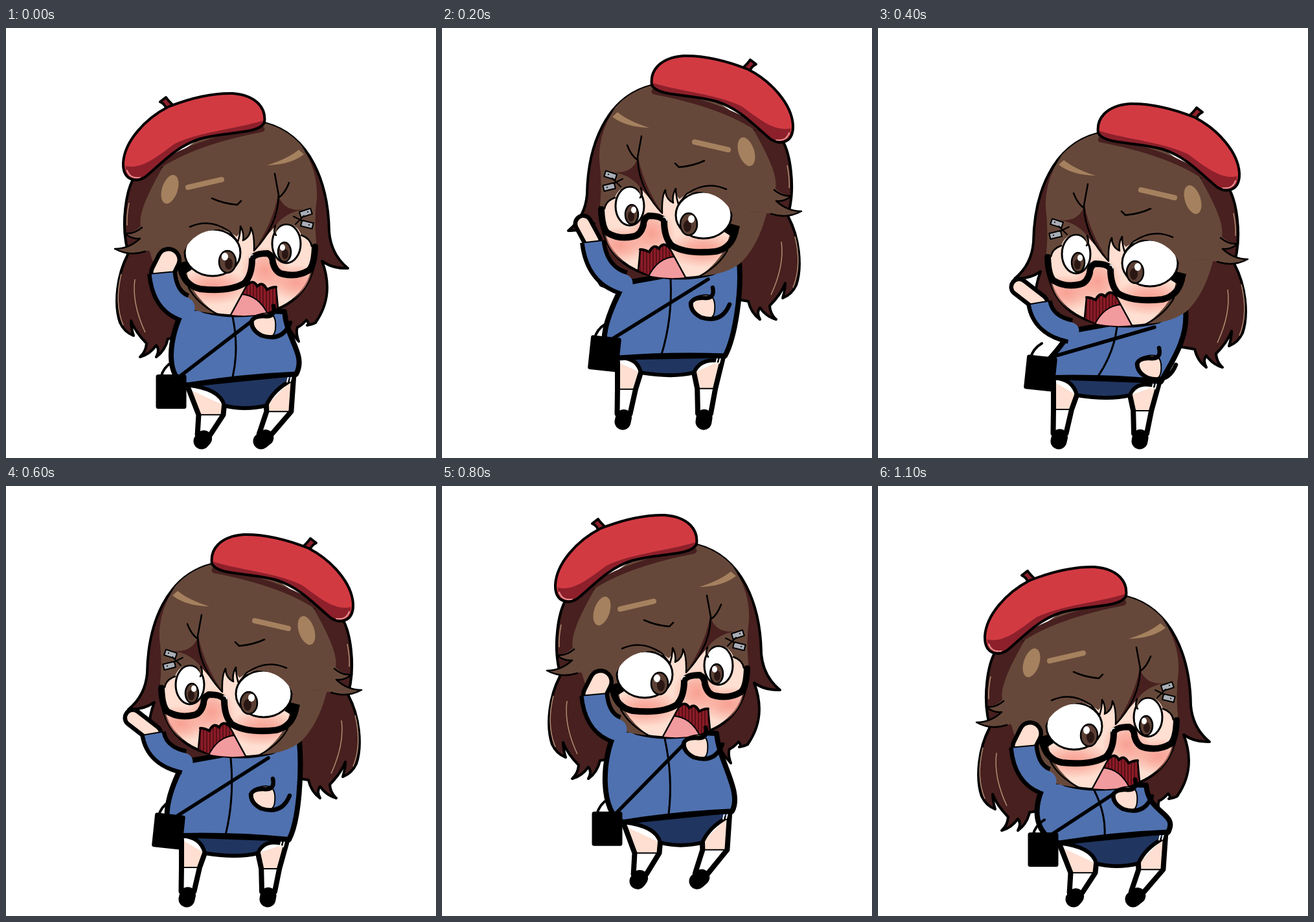
An HTML page for the animation above (1.2 s loop, 664 by 664 pixels).

```html
<!DOCTYPE html>
<html lang="en">
<head>
<meta charset="utf-8">
<title>Panicking chibi</title>
<style>
html, body { margin: 0; width: 100%; height: 100%; overflow: hidden; background: #fff; }
svg { display: block; width: 100vw; height: 100vh; }
.ink { fill: none; stroke: #000; stroke-width: 2.5; }
.bold { stroke-width: 4; }
.frame { stroke-width: 10; }
.hair { fill: #66483a; }
.dark { fill: #47201f; }
.glow { fill: #a5815f; }
.skin { fill: #fedfd1; }
</style>
</head>
<body>
<svg viewBox="0 0 664 664" stroke-linejoin="round">
  <defs>
    <radialGradient id="blush">
      <stop offset="0" stop-color="#f79a8c" stop-opacity=".9"/>
      <stop offset=".4" stop-color="#f79a8c" stop-opacity=".65"/>
      <stop offset="1" stop-color="#f79a8c" stop-opacity="0"/>
    </radialGradient>
    <clipPath id="mouth"><path d="M347 443L372 397Q382 387 388 399Q396 390 403 404Q410 400 417 400L420 432L400 441Q375 446 347 443Z"/></clipPath>
    <clipPath id="cheeks"><path d="M270 330L262 385Q285 430 305 438Q350 450 400 440C450 428 478 395 479 335L440 280L330 290Z"/></clipPath>
  </defs>

  <g class="head">
    <path class="dark ink bold" style="fill:#47201f" d="M197 232C184 255 180 300 185 330Q188 345 188 350C172 380 166 425 176 455Q183 470 197 475Q193 462 193 452Q200 470 217 487Q216 500 207 508Q222 504 232 490Q238 497 232 508Q246 498 250 480L430 450Q436 466 452 484Q447 470 450 462Q455 461 464 451Q469 457 465 459Q475 457 478 455C492 435 505 405 488 360Q505 372 528 371Q502 350 499 315C498 240 470 165 400 147Z"/>
    <path fill="none" stroke="#b28c72" stroke-width="1.5" d="M178 380Q167 425 181 459M199 388Q194 425 215 470M190 270Q186 290 187 305"/>
  </g>

  <g id="body" stroke-linecap="round"></g>

  <g class="head" stroke-linecap="round">
    <path class="skin" stroke="#000" stroke-width="4" d="M270 330L262 385Q285 430 305 438Q350 450 400 440C450 428 478 395 479 335L440 280L330 290Z"/>
    <g fill="url(#blush)" clip-path="url(#cheeks)">
      <ellipse cx="320" cy="400" rx="60" ry="28"/>
      <ellipse cx="400" cy="375" rx="38" ry="38"/>
      <ellipse cx="448" cy="393" rx="46" ry="28"/>
    </g>

    <g clip-path="url(#mouth)">
      <path fill="#8c1c26" d="M340 385H425V450H340Z"/>
      <path id="teeth" stroke="#4a0d14" stroke-width="1.5"/>
      <path fill="#f29b9f" stroke="#000" stroke-width="2" d="M340 450L362 411Q393 412 408 450Z"/>
    </g>
    <path class="ink" d="M347 443L372 397M417 400L420 432"/>
    <path class="ink bold" d="M372 397Q382 387 388 399Q396 390 403 404Q410 400 417 400"/>

    <path class="hair" d="M215 340L280 345Q268 400 325 441Q285 439 262 421Q235 395 222 345Z"/>
    <path class="ink" d="M282 401Q295 425 325 441"/>
    <g fill="#fff" stroke="#000" stroke-width="3">
      <ellipse cx="319" cy="347" rx="43" ry="36"/>
      <ellipse cx="433" cy="333" rx="22" ry="30"/>
    </g>
    <g fill="#5c4035" stroke="#000" stroke-width="2.5">
      <ellipse cx="342" cy="361" rx="13" ry="17"/>
      <ellipse cx="430" cy="346" rx="10" ry="15"/>
    </g>
    <g fill="#2a1714"><ellipse cx="344" cy="364" rx="6" ry="9"/><ellipse cx="431" cy="349" rx="5" ry="8"/></g>
    <g fill="#fff"><ellipse cx="338" cy="353" rx="5" ry="6"/><ellipse cx="427" cy="339" rx="4" ry="5"/></g>

    <path class="hair" d="M246 208C222 250 204 285 208 306Q197 317 183 317Q195 326 205 325Q190 341 168 341Q190 353 215 345Q240 336 272 350L280 335Q298 311 330 311Q345 313 356 322Q362 318 362 306Q367 318 366 328Q378 322 378 308Q384 318 383 344Q405 315 416 305Q412 315 417 320Q417 302 433 302Q450 303 456 320Q468 325 472 338L480 340Q475 300 480 262Q482 220 455 180Q432 155 400 147L300 170Z"/>
    <path class="dark" d="M420 258Q412 300 384 342Q402 322 418 303Q432 285 460 280Q430 285 420 258Z"/>
    <path class="ink" d="M210 308Q197 319 183 317Q195 327 207 325Q190 341 168 341Q190 353 215 345M284 307Q315 293 345 314Q352 322 358 330Q362 318 362 306Q368 316 366 328Q378 322 378 308Q384 318 383 344Q420 305 421 258L415 225M416 305Q412 315 417 320M318 263Q335 271 357 273L363 267M421 262Q431 255 437 239M456 320Q470 325 472 337"/>
    <path fill="none" stroke="#47201f" stroke-width="9" d="M216 228Q270 180 395 156"/>
    <ellipse class="glow" cx="253" cy="249" rx="12" ry="23" transform="rotate(18 253 249)"/>
    <path fill="none" stroke="#a5815f" stroke-width="8" d="M281 246L333 234"/>
    <path class="glow" d="M403 212Q435 202 452 188L460 195Q440 211 403 212Z"/>
    <g fill="#a9adb5" stroke="#000" stroke-width="2">
      <rect x="454" y="281" width="18" height="9" transform="rotate(-18 463 286)"/>
      <rect x="456" y="299" width="18" height="9" transform="rotate(14 465 303)"/>
      <path d="M444 291L458 298M447 303L460 290M466 284h.1M468 304h.1"/>
    </g>

    <path class="ink frame" d="M270 372Q276 398 300 403Q345 408 368 394Q380 382 380 356Q384 348 404 348Q412 352 412 362Q416 378 428 380Q450 385 468 374Q476 366 477 338"/>
    <path d="M263 364L278 360L287 373L276 380L266 376Z"/>
    <path fill="none" stroke="#fff" stroke-width="1.5" d="M376 355Q377 350 381 350"/>

    <path fill="#8d202b" stroke="#000" stroke-width="4" d="M247 124Q246 118 238 114L247 107Q251 113 261 122"/>
    <path fill="#d23a42" d="M181 208C183 175 215 140 250 122Q305 100 350 101C388 104 402 125 399 146C390 164 345 159 300 171C260 184 240 210 215 230C199 240 180 234 181 208Z"/>
    <path fill="#8d202b" d="M185 213C210 219 235 197 260 179C300 160 350 157 397 143L399 146C390 164 345 159 300 171C260 184 240 210 215 230C199 240 184 230 185 213Z"/>
    <path fill="none" stroke="#ed9294" stroke-width="2" d="M187 220Q191 233 207 231"/>
    <path class="ink bold" d="M181 208C183 175 215 140 250 122Q305 100 350 101C388 104 402 125 399 146C390 164 345 159 300 171C260 184 240 210 215 230C199 240 180 234 181 208Z"/>
  </g>

  <g id="arms"></g>
</svg>
<script>
const SKIN = '#fedfd1', BLUE = '#4f71af', NAVY = '#203560';
const stepTime = 100;

// Head offset at each step; it looks left while x is large
const moves = [
  [0, 0], [726, -79], [723, -58], [720, -30], [739, 16], [735, 5],
  [717, -26], [713, -85], [-6, -56], [-7, -14], [-20, 20], [-16, 24]
];

// Body proportions for each facing
const looks = {
  right: {
    hemX: 364, feet: [-62, 30], knee: 10, calf: 19, crotch: [-27, 38], drop: 44,
    shoulder: [-75, -14], neck: [80, -8], zip: 0, bag: [-25, 10], bagTurn: 0, sleeve: 33, palm: 27
  },
  left: {
    hemX: 353, feet: [-74, 51], knee: 0, calf: 14, crotch: [-46, 36], drop: 28,
    shoulder: [-92, 6], neck: [86, -26], zip: -20, bag: [-18, -7], bagTurn: 6, sleeve: 27, palm: 18
  }
};

const add = (p, x, y) => [p[0] + x, p[1] + y];
const mix = (p, q, t) => p.map((v, i) => v + (q[i] - v) * t);
const path = (d, fill, width = 0, color = '#000', cap = 'round') =>
  `<path d="${d}" fill="${fill}" stroke="${width ? color : 'none'}" stroke-width="${width}" stroke-linecap="${cap}"/>`;
const line = (...pts) => 'M' + pts.join('L');

function leg(outer, inner, foot, side, look) {
  const knee = add(mix(mix(outer, inner, .5), foot, .4), look.knee, 0);
  const ankle = mix(knee, foot, .75);
  const w = side * look.calf;
  const knees = [add(knee, -w, 0), add(knee, w, 0)];
  const ankles = [add(ankle, -side * 10, 0), add(ankle, side * 10, 0)];
  return path(line(outer, knees[0], knees[1], inner), SKIN) +
    path(line(knees[0], ankles[0], ankles[1], knees[1]), '#fff') +
    path(line(outer, knees[0], ankles[0]) + line(inner, knees[1], ankles[1]), 'none', 8) +
    path(line(...knees), 'none', 2) +
    path(line(add(ankle, 0, 6), foot), 'none', 25);
}

function torso(chin, hem, tilt, footY, look) {
  const hemL = add(hem, -84, -tilt / 2), hemR = add(hem, 84, tilt / 2);
  const shoulder = add(chin, ...look.shoulder), neck = add(chin, ...look.neck);
  const [crotchL, crotchR] = look.crotch.map(x => add(hem, x, look.drop - 4));
  const [footL, footR] = look.feet.map(x => [hem[0] + x, footY]);
  const bag = add(hemL, ...look.bag);
  const zip = add(chin, look.zip, 0);
  const [x, y] = hemR;
  return leg(add(hemL, 2, 6), crotchL, footL, 1, look) +
    leg(add(hemR, -4, 6), crotchR, footR, -1, look) +
    path(`M${hemL}Q${add(crotchL, -6, -26)} ${crotchL}Q${add(hem, 4, look.drop + 4)} ${crotchR}Q${add(crotchR, 10, -24)} ${add(hemR, -5, 8)}L${hemR}Z`, NAVY, 6) +
    path(`M${x - 12} ${y + 4}l-2 8m7 -9l-2 8`, 'none', 2, '#fff') +
    path(`M${shoulder}C${add(shoulder, -24, 45)} ${add(hemL, -36, -12)} ${hemL}Q${add(hem, 0, -5)} ${hemR}C${add(hemR, 16, -30)} ${add(neck, 4, 45)} ${neck}Z`, BLUE, 8) +
    path(`M${zip}Q${add(mix(zip, hem, .5), 3, 0)} ${add(hem, -14, -4)}`, 'none', 3) +
    path(line(add(chin, 38, 0), add(bag, 14, -24)), 'none', 5.5) +
    path(`M${add(bag, -16, -22)}q4 -16 18 -24`, 'none', 4) +
    `<rect x="${bag[0] - 22}" y="${bag[1] - 25}" width="44" height="50" rx="2" transform="rotate(${look.bagTurn} ${bag})" stroke="#000" stroke-width="3"/>`;
}

function raisedArm(wrist, tip, shoulder, look) {
  const bend = [mix(wrist, shoulder, .12)[0], mix(shoulder, wrist, .2)[1]];
  const sleeve = `M${wrist}Q${bend} ${shoulder}`;
  const palm = line(wrist, tip);
  const [dx, dy] = add(bend, -wrist[0], -wrist[1]);
  const k = look.sleeve / 2 / Math.hypot(dx, dy);
  return path(palm, 'none', look.palm + 13) + path(palm, 'none', look.palm, SKIN) +
    path(sleeve, 'none', look.sleeve + 13, '#000', 'butt') +
    path(sleeve, 'none', look.sleeve, BLUE, 'butt') +
    `<circle cx="${shoulder[0]}" cy="${shoulder[1]}" r="${look.sleeve / 2}" fill="${BLUE}"/>` +
    path(line(add(wrist, -dy * k, dx * k), add(wrist, dy * k, -dx * k)), 'none', 2);
}

function loweredArm(fist) {
  return path(`M${add(fist, -15, -14)}q-8 16 10 28q20 10 22 -8q2 -20 -8 -24q-12 -2 -24 4Z`, SKIN, 2) +
    path(`M${add(fist, 14, -30)}q4 18 -14 16q-16 -1 -20 8q0 14 16 22q32 10 44 -20`, 'none', 6.5);
}

function draw(step) {
  const [x, y] = moves[step];
  const left = x > 332;
  const look = left ? looks.left : looks.right;
  const chin = [x + (left ? -350 : 350), y + 446];
  const lift = Math.max(0, Math.min(1, (-30 - y) / 45));
  const raise = left ? lift * (1 - step / 12) : 0; // the wave tires
  const tilt = left ? 6 - 18 * raise : -17;
  const hem = [look.hemX, 543 - 56 * lift];
  const wrist = left ? add(chin, -140, -38 - 39 * raise) : add(chin, -109, -68);
  const tip = left ? add(wrist, -31 * (1 - raise), -24 - 7 * raise) : add(wrist, 10, -20);
  const fist = left ? add(chin, 31, 62 - 37 * raise) : add(chin, 49, 13);

  document.querySelectorAll('.head').forEach(g =>
    g.setAttribute('transform', `translate(${x} ${y}) scale(${left ? -1 : 1} 1)`));
  document.getElementById('body').innerHTML = torso(chin, hem, tilt, 638 - 48 * lift, look);
  document.getElementById('arms').innerHTML =
    raisedArm(wrist, tip, add(chin, ...look.shoulder), look) + loweredArm(fist);
}

let teeth = '';
for (let x = 352; x < 420; x += 5) teeth += `M${x} 385V450`;
document.getElementById('teeth').setAttribute('d', teeth);

let shown = -1;
function frame() {
  const step = Math.floor(performance.now() / stepTime) % moves.length;
  if (step !== shown) draw(shown = step);
  requestAnimationFrame(frame);
}
frame();
</script>
</body>
</html>
```
